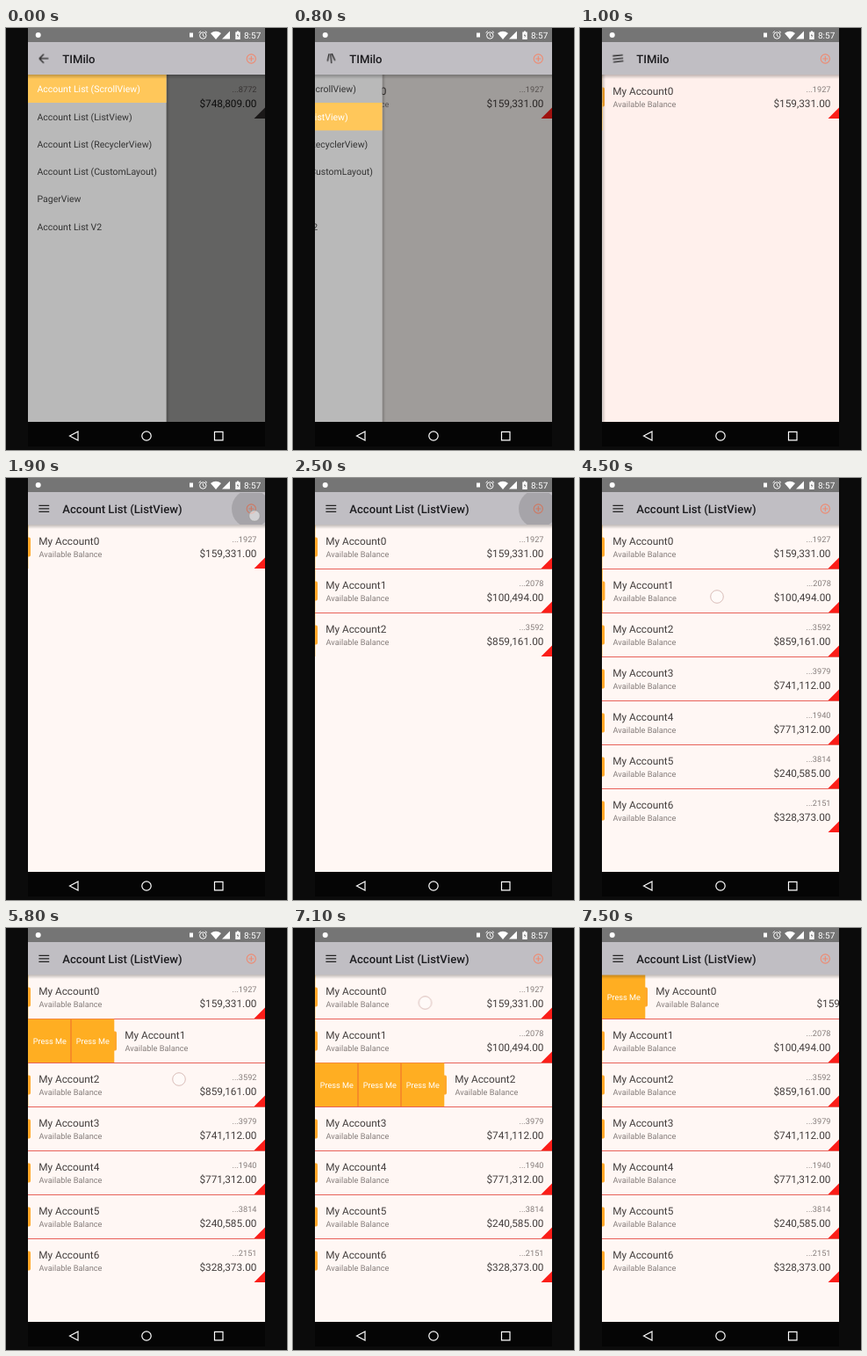
An HTML page that plays this animation: 320x480 px, repeating every 8 s.

```html
<!DOCTYPE html>
<html lang="en">
<head>
<meta charset="utf-8">
<title>Account list</title>
<style>
html, body { margin: 0; width: 100%; height: 100%; overflow: hidden; background: #0b0b0b; }
svg { display: block; width: 320px; height: 480px; font-family: Roboto, sans-serif; text-rendering: geometricPrecision; }

.name, .price { font-size: 11.8px; fill: #443f3e; }
.small { font-size: 9.2px; fill: #857d7b; }
.end { text-anchor: end; }
.press { font-size: 9.2px; fill: #fff; text-anchor: middle; }
.title { font-size: 13.1px; font-weight: 500; fill: #1c1c1f; }
.item { font-size: 10.5px; fill: #333; }
.line { fill: none; stroke: #222; stroke-width: 1.3; }
.white { fill: none; stroke: #fff; stroke-width: 1.2; }

/* One 8 s loop: 1% is 80 ms */
.anim { animation: 8s linear infinite; }
.cut { animation-timing-function: step-end; }

.drawer { animation-name: drawer; }
.scrim { animation-name: scrim; }
.burger { animation-name: burger; transform-origin: 43.25px 34.8px; }
.burger path { animation-name: bars; }
.page { animation-name: page; }
.before { animation-name: before; }
.after { animation-name: after; }
.title.before { animation-name: oldTitle; }
.title.after { animation-name: newTitle; }
.first { animation-name: first; }
.second { animation-name: second; }
.item.first { animation-name: firstText; }
.item.second { animation-name: secondText; }

@keyframes drawer {
  0%, 9.2% { transform: none; animation-timing-function: cubic-bezier(.22, 1, .36, 1); }
  15.4%, to { transform: translateX(-162px); }
}
@keyframes scrim {
  0%, 9.2% { opacity: .6; animation-timing-function: ease-out; }
  12.4%, to { opacity: 0; }
}
@keyframes burger {
  0%, 9.25% { transform: rotate(-180deg); animation-timing-function: cubic-bezier(.22, 1, .36, 1); }
  15.5%, to { transform: rotate(0deg); }
}
@keyframes bars {
  0%, 9.25% {
    d: path("M43.5 29.8L48.5 34.8M38.2 34.8L48.5 34.8M43.5 39.8L48.5 34.8");
    animation-timing-function: cubic-bezier(.22, 1, .36, 1);
  }
  15.5%, to { d: path("M37.4 31.3L49.2 31.3M37.4 34.8L49.2 34.8M37.4 38.3L49.2 38.3"); }
}
@keyframes page {
  0%, 9.2% { fill: #f9f8f6; }
  12%, 13% { fill: #fff0ec; }
  15%, to { fill: #fff7f4; }
}
@keyframes before { 0% { opacity: 1; } 9.4%, to { opacity: 0; } }
@keyframes after { 0% { opacity: 0; } 9.4%, to { opacity: 1; } }
@keyframes oldTitle { 0% { opacity: 1; } 13.75%, to { opacity: 0; } }
@keyframes newTitle { 0% { opacity: 0; } 13.75%, to { opacity: 1; } }
@keyframes first { 0% { opacity: 1; } 8.75%, to { opacity: 0; } }
@keyframes second { 0% { opacity: 0; } 8.75%, to { opacity: 1; } }
@keyframes firstText { 0% { fill: #fff; } 8.75%, to { fill: #333; } }
@keyframes secondText { 0% { fill: #333; } 8.75%, to { fill: #fff; } }

/* Rows added by the taps */
@keyframes add1 { 0% { opacity: 0; } 24.375%, to { opacity: 1; } }
@keyframes add2 { 0% { opacity: 0; } 29.375%, to { opacity: 1; } }
@keyframes add3 { 0% { opacity: 0; } 35.625%, to { opacity: 1; } }
@keyframes add4 { 0% { opacity: 0; } 40.625%, to { opacity: 1; } }
@keyframes add5 { 0% { opacity: 0; } 46.875%, to { opacity: 1; } }
@keyframes add6 { 0% { opacity: 0; } 48.375%, to { opacity: 1; } }

/* Rows pulled aside */
@keyframes slide0 {
  0%, 88.8% { transform: none; animation-timing-function: ease-out; }
  93.5%, to { transform: translateX(49px); }
}
@keyframes slide1 {
  0%, 56.25% { transform: none; animation-timing-function: ease-out; }
  61.2%, 72.6% { transform: translateX(98px); animation-timing-function: ease-out; }
  77.4%, to { transform: none; }
}
@keyframes slide2 {
  0%, 72.6% { transform: none; animation-timing-function: ease-out; }
  77.4%, 88.8% { transform: translateX(147px); animation-timing-function: ease-out; }
  93.5%, to { transform: none; }
}

.ripple { fill: #000; opacity: 0; animation-name: ripple; }
.tap { opacity: 0; fill: #fff; fill-opacity: .5; stroke: #999; stroke-width: .8; animation-name: tap; }
.finger { fill: #fff; fill-opacity: .35; stroke: #d9bdb8; stroke-width: 1; animation-name: finger; }
@keyframes ripple {
  0% { opacity: 0; }
  1%, 3.9% { opacity: .13; }
  4.9%, to { opacity: 0; }
}
@keyframes tap { 0% { opacity: 1; } 3%, to { opacity: 0; } }
@keyframes finger {
  0%, 56.18% { opacity: 0; transform: translate(156px, 135px); }
  56.2%, 56.3% { opacity: 1; transform: translate(156px, 135px); }
  59.5% { opacity: 1; transform: translate(228px, 137px); }
  59.52%, 71.23% { opacity: 0; transform: translate(197px, 172px); }
  71.25%, 72.55% { opacity: 1; transform: translate(197px, 172px); }
  75.5% { opacity: 1; transform: translate(280px, 174px); }
  75.52%, 88.72% { opacity: 0; transform: translate(150px, 85px); }
  88.74% { opacity: 1; transform: translate(150px, 85px); }
  91.5% { opacity: 1; transform: translate(210px, 86px); }
  91.52%, to { opacity: 0; transform: translate(210px, 86px); }
}
</style>
</head>
<body>
<svg viewBox="0 0 320 480">
  <defs>
    <clipPath id="screen"><path d="M25 16H295V448H25Z"/></clipPath>
    <clipPath id="bar"><path d="M25 17H295V53H25Z"/></clipPath>
    <linearGradient id="shade" x2="0" y2="1">
      <stop stop-color="#000" stop-opacity=".25"/>
      <stop offset="1" stop-color="#000" stop-opacity="0"/>
    </linearGradient>
    <linearGradient id="side">
      <stop stop-color="#000" stop-opacity=".2"/>
      <stop offset="1" stop-color="#000" stop-opacity="0"/>
    </linearGradient>
  </defs>
  <rect width="320" height="480" fill="#0b0b0b"/>

  <g clip-path="url(#screen)">
    <rect class="anim page" x="25" y="16" width="270" height="432"/>
    <g class="anim cut before">
      <text class="small end" x="285.5" y="73">...8772</text>
      <text class="price end" x="285.5" y="89.5" style="fill:#222">$748,809.00</text>
      <path d="M295 90.5V103H282.5Z" fill="#403c3c"/>
    </g>
    <g id="rows" class="anim cut after"></g>
    <rect class="anim scrim" x="25" y="53" width="270" height="395"/>
    <g class="anim drawer">
      <rect x="182.6" y="53" width="4" height="395" fill="url(#side)"/>
      <rect x="25" y="53" width="157.6" height="395" fill="#b9b9b9"/>
      <rect class="anim cut first" x="25" y="53" width="157.6" height="32" fill="#ffc75a"/>
      <rect class="anim cut second" x="25" y="85" width="157.6" height="31.5" fill="#ffc75a"/>
      <g id="menu"></g>
    </g>
    <rect x="25" y="53" width="270" height="5" fill="url(#shade)"/>
    <rect x="25" y="16" width="270" height="37" fill="#c0bec3"/>
  </g>

  <g class="anim burger"><path class="anim line" d="M37.4 31.3L49.2 31.3M37.4 34.8L49.2 34.8M37.4 38.3L49.2 38.3"/></g>
  <text class="title anim cut before" x="64.3" y="40">TIMilo</text>
  <text class="title anim cut after" x="64.3" y="40">Account List (ListView)</text>
  <g fill="none" stroke="#ef8a70" stroke-width="1.1">
    <circle cx="279.3" cy="35" r="5.1"/>
    <path d="M276.3 35H282.3M279.3 32V38"/>
  </g>
  <g id="taps" clip-path="url(#bar)"></g>
  <circle class="anim finger" r="7.3"/>

  <!-- status bar -->
  <rect x="25" width="270" height="16" fill="#757575"/>
  <g fill="#fff">
    <circle cx="36.7" cy="8" r="3"/>
    <rect x="209" y="5.5" width="4" height="5"/>
    <path d="M239 13L233 6Q239 1.5 245 6Z"/>
    <path d="M255 3.5V12.5H246Z"/>
    <path d="M261.3 4.5H263V3.5H265V4.5H266.7V13H261.3Z"/>
    <text x="271" y="12" font-size="10">8:57</text>
  </g>
  <path d="M264.4 5.8L262.8 9H264L263.6 11.6L265.4 8.2H264.1Z" fill="#757575"/>
  <g class="white" style="stroke-width:1">
    <circle cx="224.3" cy="8.5" r="3.7"/>
    <path d="M224.3 6.3V8.7L226 9.8M219.6 5.4L221.8 3.6M229 5.4L226.8 3.6"/>
  </g>

  <!-- navigation bar -->
  <rect x="25" y="448" width="270" height="28" fill="#050505"/>
  <path class="white" d="M72.5 464L82 459V469Z"/>
  <circle class="white" cx="160" cy="464" r="5.2"/>
  <path class="white" d="M237.5 459.3H247V468.8H237.5Z"/>
</svg>

<script>
const fill = (id, list, draw) => {
  document.getElementById(id).innerHTML = list.map(draw).join("");
};

const accounts = [
  ["1927", "159,331"], ["2078", "100,494"], ["3592", "859,161"], ["3979", "741,112"],
  ["1940", "771,312"], ["3814", "240,585"], ["2151", "328,373"]
];
const items = ["Account List (ScrollView)", "Account List (ListView)", "Account List (RecyclerView)",
  "Account List (CustomLayout)", "PagerView", "Account List V2"];
const taps = [1800, 2200, 2700, 3100, 3600, 3720];

// Buttons wait to the left of the row, outside the screen
const buttons = count => Array.from({ length: count }, (_, k) => {
  const x = 25 - 49 * (k + 1);
  const rule = k ? `<rect x="${x + 48.5}" y="54" width="1" height="49" fill="#ee6a2c"/>` : "";
  return `<rect x="${x}" y="53.5" width="49.3" height="49.5" fill="#ffae22"/>${rule}
    <text class="press" x="${x + 24.8}" y="81.7">Press Me</text>`;
}).join("");

fill("rows", accounts, ([number, sum], i) => `
  <g transform="translate(0 ${50 * i})">
    <g class="anim cut" style="animation-name:add${i}">
      ${i ? '<rect x="25" y="53" width="270" height="1" fill="#e8625a"/>' : ""}
      <g class="anim" style="animation-name:slide${i}">
        ${i < 3 ? buttons(i + 1) : ""}
        <path d="M25 67.5H26.3Q28 67.5 28 69.5V87.5Q28 89.5 26.3 89.5H25Z" fill="#ffa92b"/>
        <text class="name" x="37.2" y="76">My Account${i}</text>
        <text class="small" x="37.6" y="90.3">Available Balance</text>
        <text class="small end" x="285.5" y="73">...${number}</text>
        <text class="price end" x="285.5" y="89.5">$${sum}.00</text>
        <path d="M295 90.5V103H282.5Z" fill="#fb1d18"/>
      </g>
    </g>
  </g>`);

fill("menu", items, (label, i) =>
  `<text class="item anim cut ${["first", "second"][i] || ""}" x="35.5" y="${73.2 + 31.3 * i}">${label}</text>`);

fill("taps", taps, ms => `
  <circle class="anim ripple" cx="279" cy="35" r="22" style="animation-delay:${ms}ms"/>
  <circle class="anim cut tap" cx="283" cy="43" r="6.3" style="animation-delay:${ms}ms"/>`);
</script>
</body>
</html>
```
